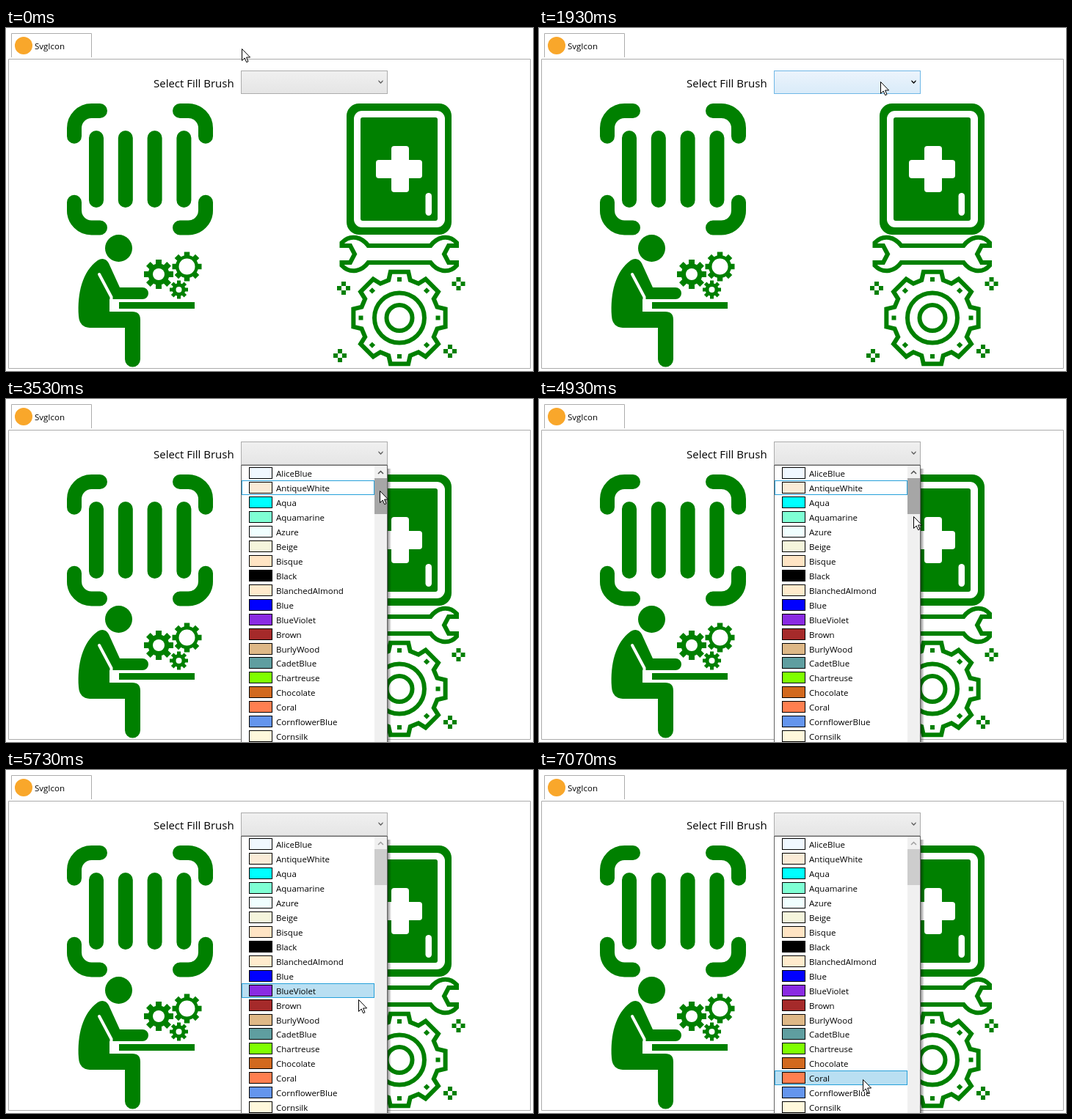
An HTML page that plays this animation: 718x468 px, repeating every 8 s.

```html
<!DOCTYPE html>
<html lang="en">
<head>
<meta charset="utf-8">
<title>SvgIcon</title>
<style>
  html, body { margin: 0; width: 100%; height: 100%; overflow: hidden; background: #fff; }
  svg { display: block; width: 718px; height: 468px; font: 11.5px "Open Sans", "Noto Sans", sans-serif; }
  .icons { fill: #008000; }
  .line { fill: none; stroke: #008000; stroke-width: 6; }
  .thick { fill: none; stroke: #008000; stroke-width: 20; stroke-linecap: round; }
  .white { fill: #fff; }
  .frame { fill: none; stroke: #acacac; }
</style>
</head>
<body>
<svg viewBox="0 0 718 468">
  <defs>
    <linearGradient id="idle" x2="0" y2="1"><stop stop-color="#f0f0f0"/><stop offset="1" stop-color="#e5e5e5"/></linearGradient>
    <linearGradient id="hot" x2="0" y2="1"><stop stop-color="#ecf4fc"/><stop offset="1" stop-color="#d9ebf9"/></linearGradient>
    <linearGradient id="shade"><stop stop-opacity=".44"/><stop offset="1" stop-opacity="0"/></linearGradient>
    <clipPath id="below"><path d="M320 90H525V468H320Z"/></clipPath>
  </defs>

  <path class="frame" d="M7.500 40V7.500H116.500V40M3.500 42.500H714.500V464.500H3.500Z"/>
  <circle cx="24" cy="24" r="12" fill="#f9a72b"/>
  <text x="39" y="29">SvgIcon</text>
  <text x="201" y="81" font-size="15">Select Fill Brush</text>

  <g class="icons">
    <g id="scan"></g>
    <g id="worker">
      <circle cx="153.500" cy="300.500" r="18.500"/>
      <path d="M125 317C131 313 137 315 140 321L155 354H186A8 8 0 0 1 186 370H141V387H172Q183 387 183 398V452A10.500 10.500 0 0 1 162 452V409H114Q100 408 99 393C97 362 104 332 125 317Z"/>
      <path d="M127 336L143.500 367V371" fill="none" stroke="#fff" stroke-width="4" stroke-linecap="round"/>
      <path d="M154 374H257V383H154Z"/>
    </g>
    <g id="tablet">
      <rect x="464" y="103" width="143" height="179" rx="17"/>
      <rect class="white" x="474" y="113" width="124" height="159" rx="11"/>
      <rect x="483" y="122" width="105" height="141" rx="3"/>
      <rect class="white" x="525" y="161" width="24" height="63" rx="4"/>
      <rect class="white" x="504" y="180" width="63" height="25" rx="4"/>
      <rect class="white" x="571.500" y="225" width="8.500" height="31" rx="4.200"/>
    </g>
    <g id="tools"></g>
  </g>

  <rect id="combo" x="320.500" y="58.500" width="199" height="31"/>
  <path id="chevron" d="M507.500 71v2l3 3 3-3v-2l-3 3Z"/>

  <g clip-path="url(#below)">
    <g id="popup">
      <path d="M520 95H525V600H520Z" fill="url(#shade)"/>
      <rect x="320.500" y="90.500" width="199" height="480" fill="#fff" stroke="#646464"/>
      <path d="M502 91H519V570H502Z" fill="#f0f0f0"/>
      <path id="thumb" d="M502 108H519V157H502Z"/>
      <path id="up" d="M507 102l3.500-3.500 3.500 3.500" fill="none" stroke-width="1.500"/>
      <rect id="mark" x="321.500" width="180" height="19" stroke="#26a0da"/>
      <g id="list"></g>
    </g>
  </g>
  <path id="cursor" d="M.5 .5V16.500L4.200 13 6.700 18.700 9 17.700 6.600 12H11.600Z" fill="#fff" stroke="#000"/>
</svg>
<script>
const $ = id => document.getElementById(id);
const LOOP = 8000, STEP = 1000 / 15;
const COLORS = ('AliceBlue AntiqueWhite Aqua Aquamarine Azure Beige Bisque Black BlanchedAlmond Blue ' +
  'BlueViolet Brown BurlyWood CadetBlue Chartreuse Chocolate Coral CornflowerBlue Cornsilk').split(' ');
const ROW = 19.96, BAR_X = 502, FOCUS_ROW = 1;
const rowTop = i => Math.round(91 + ROW * i);
const range = n => [...Array(n).keys()];

// Scan icon: one corner mirrored four ways around its centre
const corners = [[1, 1], [-1, 1], [1, -1], [-1, -1]].map(([sx, sy]) =>
  `<path transform="translate(182.5 192.75) scale(${sx} ${sy})" d="M-54.5 -79.75H-66A23.500 23.500 0 0 0 -89.500 -56V-45"/>`);
$('scan').innerHTML = `<g class="thick">${corners.join('')}<path d="M123 150V235M162.800 150V235M202.600 150V235M242.400 150V235"/></g>`;

// Solid cog with eight square teeth
function cog(x, y, tip, body, hole, tooth) {
  const bars = range(4).map(i => `<path transform="rotate(${i * 45})" d="M${-tip} 0H${tip}" stroke="#008000" stroke-width="${tooth}"/>`);
  return `<g transform="translate(${x} ${y})">${bars.join('')}<circle r="${body}"/><circle class="white" r="${hole}"/></g>`;
}
$('worker').innerHTML += cog(208, 336, 20, 14.5, 8, 8) + cog(246.5, 325.5, 20, 15.5, 11, 7.5) + cog(235.5, 357, 12.5, 9, 4, 5);

// Outlined gear, wrench and sparkles
const polar = (r, deg) => {
  const a = deg * Math.PI / 180;
  return `${(r * Math.sin(a)).toFixed(2)},${(-r * Math.cos(a)).toFixed(2)}`;
};
const teeth = range(8).flatMap(i =>
  [[53.5, -16], [63.8, -11], [63.8, 11], [53.5, 16]].map(([r, d]) => polar(r, i * 45 + d)));
const studs = range(8).map(i => `<rect transform="rotate(${i * 45})" x="-3" y="-55.5" width="6" height="6"/>`);
const sparkle = (x, y) => `<path transform="translate(${x} ${y})" d="M-3 -9h6v6h-6zM-3 3h6v6h-6zM-9 -3h6v6h-6zM3 -3h6v6h-6z"/>`;
$('tools').innerHTML =
  `<path class="line" d="M457.500 293Q466 284 477 286 487 288 493.500 297H578.500Q585 288 595 286 606 284 614 293V297H603L597 308.500 603 320H614V324Q606 333 595 331 585 329 578.500 320H493.500Q487 329 477 331 466 333 457.500 324V320H469L475 308.500 469 297H457.500Z"/>` +
  `<g transform="translate(536 395.5)"><polygon class="line" points="${teeth.join(' ')}"/>` +
  `<circle class="line" r="34"/><circle class="line" r="17.500"/>${studs.join('')}</g>` +
  [[460, 355], [616.5, 349], [455, 447], [605, 441]].map(p => sparkle(...p)).join('');

$('list').innerHTML = COLORS.map((name, i) => {
  const y = rowTop(i);
  return `<rect x="331.5" y="${y + 2.5}" width="31" height="15" fill="${name}" stroke="#000"/><text x="368" y="${y + 15}">${name}</text>`;
}).join('');

// Pointer path: time, x, y
const PATH = [
  [0, 321, 28], [1200, 321, 28], [1930, 465, 73], [2800, 465, 73], [3130, 476, 88],
  [3530, 509, 125], [4870, 509, 125], [4930, 510, 160], [5000, 510, 160], [5330, 491, 195],
  [5670, 481, 311], [5730, 480, 313], [5870, 479, 320], [6530, 451, 401], [6800, 451, 401],
  [7070, 441, 422], [LOOP, 441, 422]
];
function pointer(t) {
  const i = Math.max(1, PATH.findIndex(p => p[0] >= t));
  const [t0, x0, y0] = PATH[i - 1], [t1, x1, y1] = PATH[i];
  let k = Math.min(1, Math.max(0, (t - t0) / (t1 - t0)));
  if (t1 === 1930) k = k * k * (3 - 2 * k);
  return [Math.round(x0 + (x1 - x0) * k), Math.round(y0 + (y1 - y0) * k)];
}

function set(id, attrs) {
  for (const key in attrs) $(id).setAttribute(key, attrs[key]);
}

function draw(now) {
  // The screen is refreshed fifteen times a second; hover follows one refresh late
  const t = Math.floor((now % LOOP + 4) / STEP) * STEP;
  const [x, y] = pointer(t), [hx, hy] = pointer(t - STEP);
  const open = t > 2525, sliding = open && t < 2590;
  const onCombo = hx >= 320 && hy >= 58 && hy < 90;
  const onBar = hx >= BAR_X;
  const onList = open && hy >= 91;
  const row = onBar ? FOCUS_ROW : Math.floor((hy - 91) / ROW);

  set('cursor', { transform: `translate(${x} ${y})` });
  set('combo', { fill: `url(#${onCombo ? 'hot' : 'idle'})`, stroke: onCombo ? '#6fb7e6' : '#acacac' });
  set('chevron', { fill: onCombo ? '#000' : '#606060' });
  set('popup', { visibility: open ? 'visible' : 'hidden', transform: `translate(0 ${sliding ? -190 : 0})` });
  set('thumb', { fill: onList && onBar ? '#a6a6a6' : '#cdcdcd' });
  set('up', { stroke: onList && onBar ? '#505050' : '#a0a0a0' });
  set('mark', { y: rowTop(Math.max(0, row)) + 0.5, fill: onBar ? '#fff' : '#b9dff2', opacity: onList ? 1 : 0 });
}

function tick() {
  draw(performance.now());
  requestAnimationFrame(tick);
}
tick();
</script>
</body>
</html>
```
